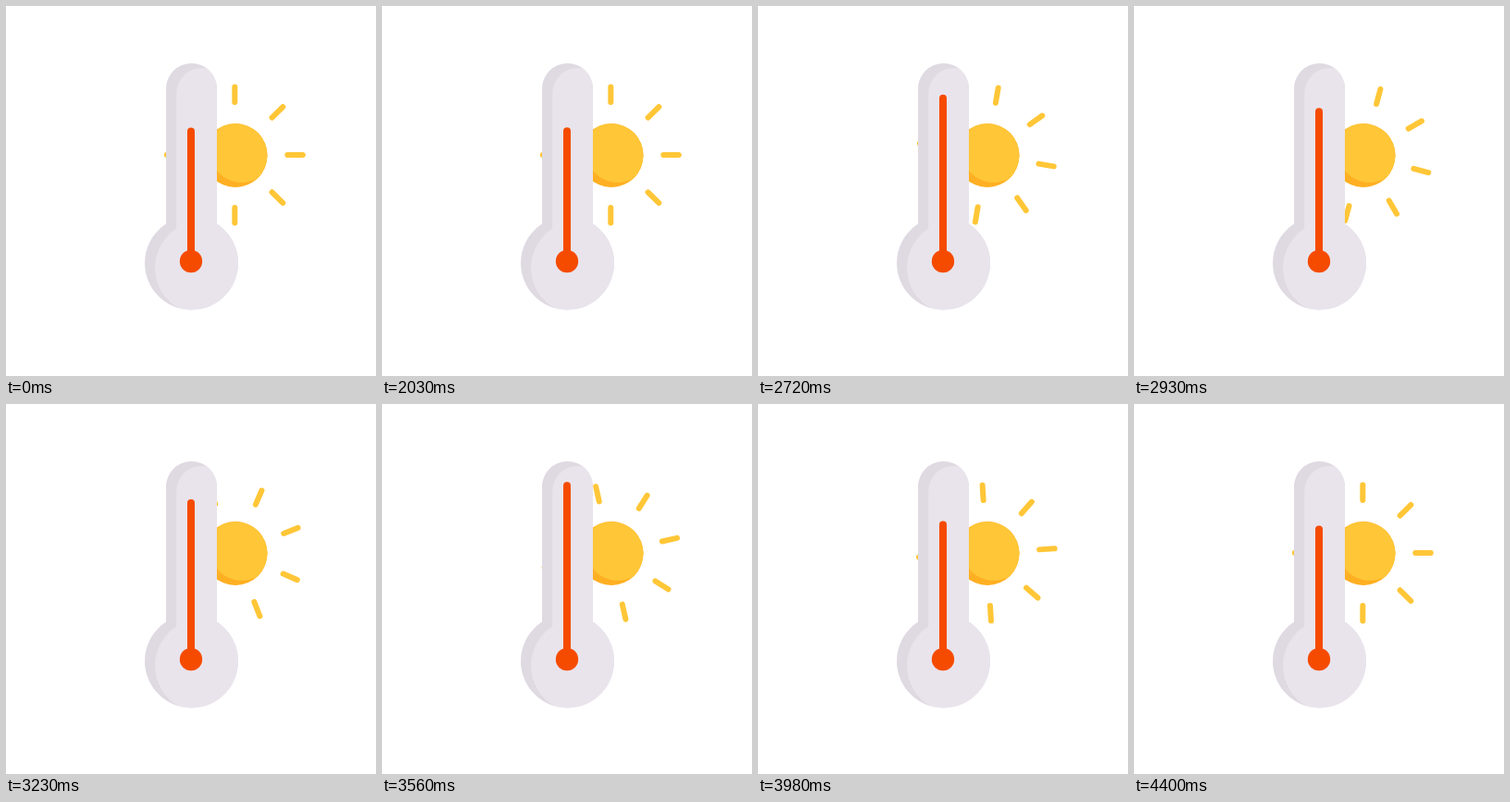
An HTML page that plays this animation: 400 px wide and 400 px high, repeating every 4460 ms.

```html
<!DOCTYPE html>
<html lang="en">
<head>
<meta charset="utf-8">
<title>Thermometer and sun</title>
<style>
  html, body { margin: 0; width: 100%; height: 100%; overflow: hidden; background: #fff; }
  svg { display: block; width: 100%; height: 100%; }
</style>
</head>
<body>
<svg viewBox="0 0 400 400">
  <defs>
    <path id="body" d="M173 89.5a27.5 27.5 0 0 1 55 0V235.6A50.5 50.5 0 1 1 173 235.6Z"/>
    <circle id="disc" cx="248" cy="161.5" r="34.5"/>
    <clipPath id="bodyClip"><use href="#body"/></clipPath>
    <clipPath id="discClip"><use href="#disc"/></clipPath>
  </defs>

  <g id="rays" stroke="#ffc637" stroke-width="6" stroke-linecap="round"></g>
  <use href="#disc" fill="#ffaf22"/>
  <g clip-path="url(#discClip)"><use href="#disc" x="7" y="-5" fill="#ffc637"/></g>

  <use href="#body" fill="#dfd9e2"/>
  <g clip-path="url(#bodyClip)"><use href="#body" x="11.2" y="5" fill="#e9e4ec"/></g>

  <line id="mercury" x1="200" x2="200" y2="276" stroke="#f54b00" stroke-width="8" stroke-linecap="round"/>
  <circle cx="200" cy="276" r="12.2" fill="#f54b00"/>
</svg>
<script>
  const LOOP = 4460, HOLD = 2000, STEP = 30, STEPS = 80;
  const rays = document.getElementById('rays');
  const mercury = document.getElementById('mercury');

  // [step, top of the mercury column]
  const levels = [[0, 131.5], [20, 92], [35, 114], [50, 83], [70, 131.5], [80, 131.5]];

  rays.innerHTML = Array.from({ length: 8 }, (_, i) =>
    `<path d="M57 0H73.5" transform="rotate(${i * 45})"/>`).join('');

  const ease = p => p * p * (3 - 2 * p);

  function levelAt(step) {
    const i = Math.max(1, levels.findIndex(([s]) => s >= step));
    const [s0, y0] = levels[i - 1], [s1, y1] = levels[i];
    return y0 + (y1 - y0) * ease((step - s0) / (s1 - s0));
  }

  function draw(time) {
    const elapsed = Math.floor((time % LOOP - HOLD) / STEP);
    const step = Math.min(STEPS, Math.max(0, elapsed));
    rays.setAttribute('transform', `translate(247.3 161) rotate(${45 * ease(step / STEPS)})`);
    mercury.setAttribute('y1', levelAt(step) + 4);
  }

  const start = performance.now();
  function tick() {
    draw(performance.now() - start);
    requestAnimationFrame(tick);
  }
  tick();
</script>
</body>
</html>
```
